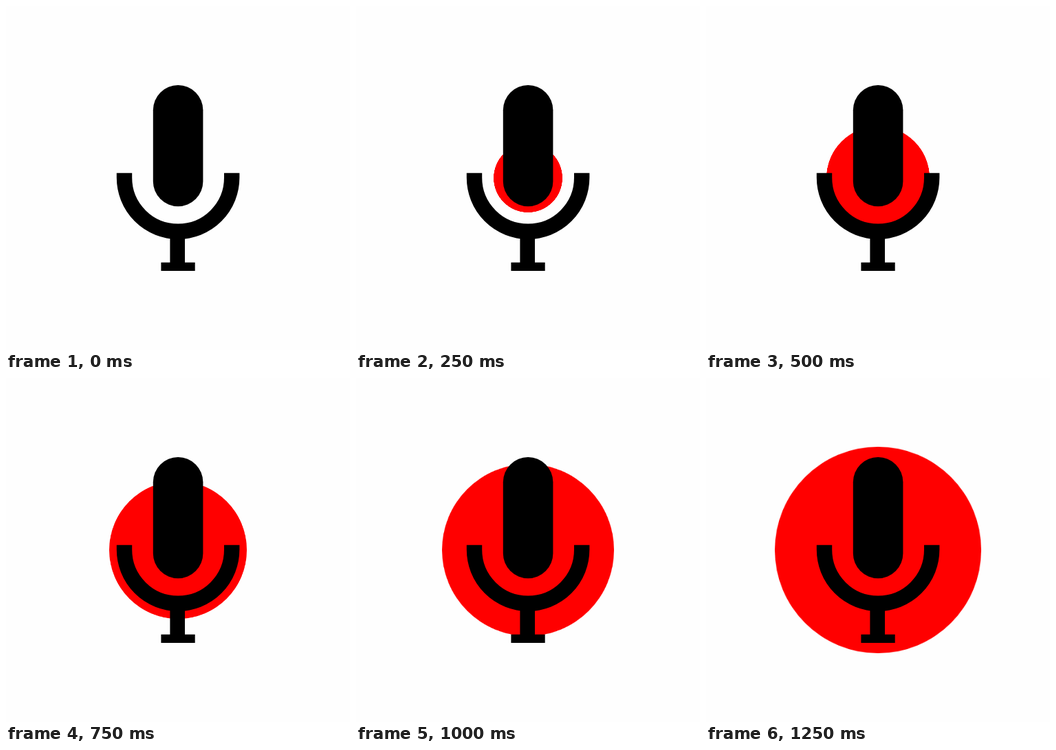
These frames come from a looping animation (500 px wide and 500 px high, 1.5 s). An HTML page:

```html
<!DOCTYPE html>
<html lang="en">
<head>
<meta charset="utf-8">
<title>Microphone</title>
<style>
  html, body { margin: 0; width: 100%; height: 100%; overflow: hidden; background: #fefefe; }
  svg { display: block; width: 100%; height: 100%; }
  /* The radius grows by 25 at each hard step; the first size hides behind the capsule. */
  .pulse {
    fill: #f00;
    transform-origin: 250px 250px;
    animation: grow 1500ms steps(6, end) infinite;
  }
  @keyframes grow {
    from { transform: scale(1); }
    to { transform: scale(7); }
  }
</style>
</head>
<body>
<svg viewBox="0 0 500 500">
  <circle class="pulse" cx="250" cy="250" r="25"/>
  <rect x="213.8" y="115" width="72.6" height="176.2" rx="36.3"/>
  <path d="M172 242.7V249.6A78.1 78.1 0 0 0 328.2 249.6V242.7" fill="none" stroke="#000" stroke-width="22.4"/>
  <path d="M238.4 330H260V372.8H274.7V385H225.4V372.8H238.4Z"/>
</svg>
</body>
</html>
```
